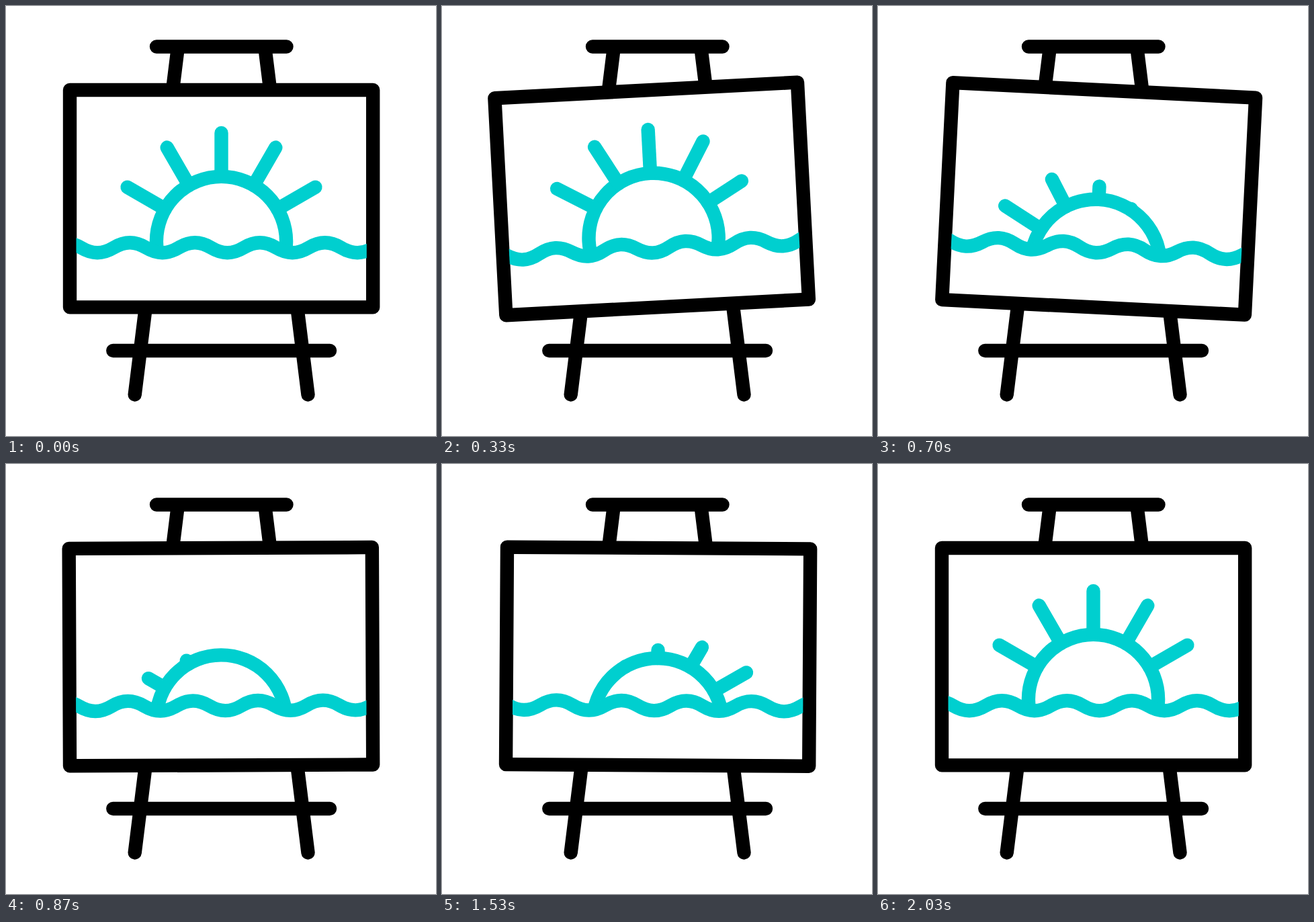
Animation of 640 by 640 pixels, one loop 2.8 s. Source, as an HTML page:

```html
<!DOCTYPE html>
<html lang="en">
<head>
<meta charset="utf-8">
<title>Sunrise on an easel</title>
<style>
  html, body { margin: 0; width: 100%; height: 100%; overflow: hidden; background: #fff; }
  svg { display: block; width: 100%; height: 100%; }
  .line { fill: none; stroke-width: 20.4; stroke-linecap: round; stroke-linejoin: round; }
  .ink { stroke: #000; }
  .sea { stroke: #00cfcf; }
</style>
</head>
<body>
<svg viewBox="0 0 640 640">
  <defs>
    <clipPath id="canvas"><rect x="104.5" y="135" width="432.3" height="303"/></clipPath>
    <clipPath id="sky"><path id="skyShape"/></clipPath>
  </defs>
  <path class="line ink" d="M224 60.5H417.5M159.3 513H482M256 60.5L191.7 578.5M385.2 60.5L449.5 578.5"/>
  <g id="board">
    <rect class="line ink" x="95" y="125" width="451.2" height="323.4" style="fill:#fff"/>
    <g clip-path="url(#canvas)">
      <g clip-path="url(#sky)">
        <g id="sun">
          <circle class="line sea" cx="320.5" cy="350.5" r="96.6"/>
        </g>
      </g>
      <path id="wave" class="line sea"/>
    </g>
  </g>
</svg>
<script>
const LOOP = 2800, FPS = 30;
const SUN_R = 96.6, RAY = 65;
const $ = id => document.getElementById(id);

// Keys are [step, value] pairs, time in thirtieths of a second.
const TILT = [[0, 0], [10, -3], [20, 3], [30, -2], [40, 1], [50, 0]];
const DRIFT = [[0, 0], [15, -14.8], [30, 0], [45, -14.8], [60, 0]];
const DROP = [[0, 0], [10, -5.3], [18.6, 35.3], [25, 30.5],
              [36, 30.5], [46, 35.1], [54.6, -5.3], [61, 0]];

const smooth = u => {
  u = Math.min(1, Math.max(0, u));
  return u * u * (3 - 2 * u);
};

function valueAt(keys, n) {
  let value = keys[0][1];
  for (let i = 1; i < keys.length; i++) {
    const [a, from] = keys[i - 1], [b, to] = keys[i];
    if (n >= a) value = from + (to - from) * smooth((n - a) / (b - a));
  }
  return value;
}

const period = 's17.4-3.4 24.19-7.45s14.3-7.45 24.19-7.45' +
               's17.4 3.4 24.19 7.45s14.3 7.45 24.19 7.45';
const waveLine = 'M39.25 367.2' + period.repeat(6);
$('wave').setAttribute('d', waveLine);
$('skyShape').setAttribute('d', waveLine + 'V0H39.25Z');

// Rays run from right to left, the order in which they hide and return.
const rays = [60, 30, 0, -30, -60].map(angle => {
  const ray = document.createElementNS('http://www.w3.org/2000/svg', 'path');
  ray.setAttribute('class', 'line sea');
  ray.setAttribute('transform', `translate(320.5 350.5) rotate(${angle})`);
  $('sun').append(ray);
  return ray;
});

function draw(n) {
  const drift = `translate(${valueAt(DRIFT, n)} 0)`;
  $('board').setAttribute('transform', `rotate(${valueAt(TILT, n)} 320.5 448.4)`);
  $('wave').setAttribute('transform', drift);
  $('skyShape').setAttribute('transform', drift);
  $('sun').setAttribute('transform', `translate(0 ${valueAt(DROP, n)})`);
  rays.forEach((ray, i) => {
    const hidden = smooth((n - 8 - 3 * i) / 11);
    const back = smooth((n - 36.6 - 3 * i) / 12.4);
    const length = RAY * (1 - hidden + back);
    ray.setAttribute('d', length > 0.1 ? `M0 ${-SUN_R}v${-length}` : '');
  });
}

const start = performance.now();
function tick() {
  const t = (performance.now() - start) % LOOP;
  draw(Math.floor((t + 3.4) * FPS / 1000));
  requestAnimationFrame(tick);
}
tick();
</script>
</body>
</html>
```
